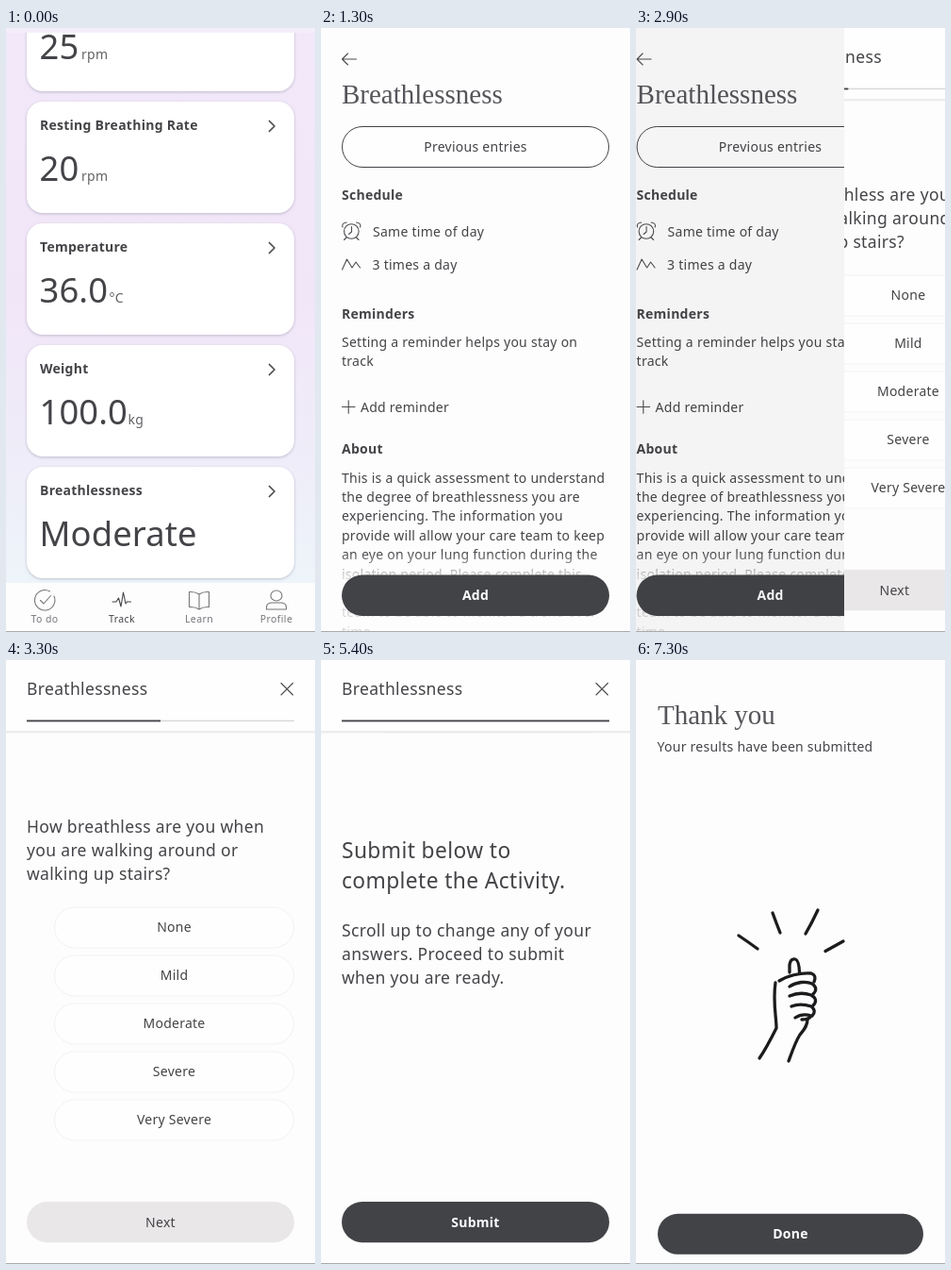
These frames come from a looping animation (328x640 px, 8 s). An HTML page:

```html
<!DOCTYPE html>
<html lang="en">
<head>
<meta charset="utf-8">
<title>Breathlessness check-in</title>
<style>
  html, body { margin: 0; width: 100%; height: 100%; overflow: hidden; background: #fdfdfd; }
  svg { display: block; width: 100%; height: 100%; }
  text { font: 14px "Noto Sans", "Open Sans", sans-serif; letter-spacing: .26px; fill: #444448; white-space: pre; }
  .semi { font-weight: 600; }
  .big { font-size: 36.4px; letter-spacing: .1px; }
  .unit { fill: #626266; }
  .serif { font: 29px "Liberation Serif", "Times New Roman", serif; letter-spacing: 0; fill: #55555a; }
  .lead { font-size: 17.5px; letter-spacing: .34px; }
  .head { font-size: 22.75px; letter-spacing: .4px; }
  .tab { font-size: 10.5px; letter-spacing: .4px; fill: #77777b; }
  .on { fill: #444448; }
  .light { fill: #fff; font-weight: 600; }
  .mid { text-anchor: middle; }
  .ico { fill: none; stroke: #4c4c50; stroke-width: 1.1; stroke-linecap: round; stroke-linejoin: round; }
  .ink { fill: none; stroke: #1c1c1e; stroke-width: 3.3; stroke-linecap: round; stroke-linejoin: round; }
  .card { filter: drop-shadow(0 1.5px 1.5px rgba(70, 60, 90, .28)); }
</style>
</head>
<body>
<svg id="stage" viewBox="0 0 328 640"></svg>
<script>
const W = 328, H = 640, LOOP = 8000, STEP = 100;
const DARK = '#424347', PALE = '#e9e7e8', PAGE = '#fdfdfd';

const text = (x, y, s, cls = '', more = '') => `<text x="${x}" y="${y}" class="${cls}" ${more}>${s}</text>`;
const lines = (x, y, gap, list, cls) => list.map((s, i) => text(x, y + i * gap, s, cls)).join('');
const rect = (x, y, w, h, fill, more = '') => `<rect x="${x}" y="${y}" width="${w}" height="${h}" fill="${fill}" ${more}/>`;
const path = (d, cls = 'ico', more = '') => `<path d="${d}" class="${cls}" ${more}/>`;
const pill = (x, y, w, h, fill, more = '') => rect(x, y, w, h, fill, `rx="${h / 2}" ${more}`);

function card(y, title, value, unit = '', unitX = 0, id = '') {
  return `<g ${id && `id="${id}"`}>` +
    rect(22, y, 284, 118, '#fff', 'rx="17" class="card"') +
    text(36, y + 30, title, 'semi') +
    path(`M279.5 ${y + 20.5}l5.5 5.5l-5.5 5.5`, 'ico', 'style="stroke-width:1.7"') +
    text(35.5, y + 84, value, 'big') + text(unitX, y + 84, unit, 'unit') + '</g>';
}

function tab(x, label, icon, cls = '') {
  return path(icon, 'ico', `style="stroke:${cls ? DARK : '#77777b'}"`) + text(x, 630, label, 'tab mid ' + cls);
}

const home = rect(0, 0, W, H, 'url(#sky)') +
  card(-51, 'Breathing Rate', '25', 'rpm', 80) +
  card(78, 'Resting Breathing Rate', '20', 'rpm', 80) +
  card(207, 'Temperature', '36.0', '°C', 109.5) +
  card(336, 'Weight', '100.0', 'kg', 129.5) +
  card(465, 'Breathlessness', 'Moderate', '', 0, 'tapped') +
  rect(0, 0, W, 5, '#f4eefa') +
  rect(0, 588, W, 52, '#fdfdfe') +
  tab(41, 'To do', 'M51 602A10.7 10.7 0 1 1 46.5 597M36.5 606.5l3.5 3.5l7.5 -8.5') +
  tab(123, 'Track', 'M113 608h4l2.5 -4l2.5 9l2.5 -15l2.5 12l1.5 -2h4', 'on') +
  tab(205, 'Learn', 'M205 600q-4 -3 -10.5 -2.5v16q6.5 -.5 10.5 2.5q4 -3 10.5 -2.5v-16q-6.5 -.5 -10.5 2.5v16') +
  tab(287, 'Profile', 'M281 601.5a6 5.5 0 1 1 12 0a6 5.5 0 1 1 -12 0M276.5 616v-2q0 -5 6 -5h9q6 0 6 5v2z');

const detail = rect(0, 0, W, H, PAGE) +
  path('M37.5 33H22.5M28.5 27l-6 6l6 6') +
  text(22, 79.5, 'Breathlessness', 'serif') +
  pill(22.5, 104.5, 283, 43, '#fefefe', `stroke="${DARK}"`) +
  text(164, 131, 'Previous entries', 'mid') +
  text(22, 181.5, 'Schedule', 'semi') +
  path('M24.5 215.5a7.8 7.8 0 1 1 15.6 0a7.8 7.8 0 1 1 -15.6 0M32.5 210.5v5.5l-3 2.5M23 211q-1.5 -4 4 -5M41.6 211q1.5 -4 -4 -5M27 222l-2.5 2.5M37.5 222l2.5 2.5') +
  text(55, 220.5, 'Same time of day') +
  path('M22.5 256l5 -11l5.5 9l4 -6l4.5 6') +
  text(54.5, 255.5, '3 times a day') +
  text(22, 307.5, 'Reminders', 'semi') +
  lines(22, 338, 19.8, ['Setting a reminder helps you stay on', 'track']) +
  path('M22.5 401.5h13.5M29.2 394.7v13.6') +
  text(42, 406.5, 'Add reminder') +
  text(22, 450.5, 'About', 'semi') +
  lines(22, 481.5, 20.4, [
    'This is a quick assessment to understand', 'the degree of breathlessness you are',
    'experiencing. The information you', 'provide will allow your care team to keep',
    'an eye on your lung function during the', 'isolation period. Please complete this',
    'assessment each day to allow your care', 'team to be able to monitor a trend over', 'time.']) +
  rect(0, 555, W, 85, 'url(#fade)') +
  `<g id="add">${pill(22, 579.5, 284, 43.5, DARK)}${text(164, 606, 'Add', 'light mid')}</g>`;

const choices = ['None', 'Mild', 'Moderate', 'Severe', 'Very Severe'];
const survey = rect(0, 0, W, H, PAGE) +
  '<g id="question">' +
  lines(22, 182.5, 25, ['How breathless are you when', 'you are walking around or', 'walking up stairs?'], 'lead') +
  choices.map((c, i) => {
    const y = 262 + i * 51;
    return pill(51.5, y, 254, 43, '#fefefe', `stroke="#f3f2f3" ${i === 2 ? 'id="picked"' : ''}`) +
      text(178.5, y + 26, c, 'mid');
  }).join('') + '</g><g id="summary">' +
  lines(22, 210, 32, ['Submit below to', 'complete the Activity.'], 'head') +
  lines(22, 292.5, 25, ['Scroll up to change any of your', 'answers. Proceed to submit', 'when you are ready.'], 'lead') +
  '</g>' +
  rect(0, 0, W, 76, '#fefefe') + rect(0, 75.5, W, 3.5, 'url(#edge)') +
  text(22, 36.5, 'Breathlessness', 'lead') +
  path('M292 24.5l12.5 12.5M304.5 24.5l-12.5 12.5') +
  rect(22, 63.7, 284, 1.5, '#d9d8da') + rect(22, 63.6, 0, 1.8, DARK, 'id="bar"') +
  pill(22, 574, 284, 43.2, PALE, 'id="next"') +
  text(164, 600.5, 'Next', 'mid', 'id="label"') +
  path('M164 580.5A15.5 15.5 0 1 0 179.5 596', 'ink', 'id="spin" style="stroke:#fff;stroke-width:3;stroke-linecap:butt"');

const done = rect(0, 0, W, H, PAGE) +
  text(23, 68, 'Thank you', 'serif') +
  text(22.5, 97, 'Your results have been submitted') +
  path('M109 292q9 6 20 14M145 268q4 11 8 21M193 265q-6 13 -13 25M220 298q-9 5 -19 10.5', 'ink') +
  path('M163 331v-8q1 -7 6 -6q4 1 4.5 14', 'ink') +
  path('M152 340C160 335 174 331 186 332Q192 334 189 341', 'ink') +
  path('M163 346C170 341 181 340 187 343Q194 348 188 354M163 356C172 352 180 353 186 355Q194 360 188 366M165 367C172 364 180 365 186 367Q192 372 187 377M169 379C175 375 180 375 186 377Q184 381 176 381', 'ink') +
  path('M148 342C145 362 149 378 149 390C143 402 138 412 131 422', 'ink') +
  path('M182 381C182 388 178 392 174 397C169 405 166 414 162 425', 'ink') +
  pill(23, 586.8, 282, 43, DARK) + text(164, 613, 'Done', 'light mid');

const pages = [home, detail, survey, done];
const stop = (o, c, a = 1) => `<stop offset="${o}" stop-color="${c}" stop-opacity="${a}"/>`;
const gradient = (id, stops) => `<linearGradient id="${id}" x1="0" y1="0" x2="0" y2="1">${stops}</linearGradient>`;

const stage = document.getElementById('stage');
stage.innerHTML = '<defs>' +
  gradient('sky', stop(0, '#f1e8f9') + stop(.45, '#f1e6f8') + stop(.72, '#efedf9') + stop(.92, '#edf4fa')) +
  gradient('fade', stop(0, PAGE, 0) + stop(.3, PAGE, .78) + stop(1, PAGE, .8)) +
  gradient('edge', stop(0, '#dcdbdd') + stop(1, PAGE, 0)) +
  pages.map((_, i) => `<clipPath id="clip${i}"><rect id="cut${i}" width="${W}" height="${H}"/></clipPath>`).join('') +
  '</defs>' +
  pages.map((p, i) => `<g id="page${i}" clip-path="url(#clip${i})"><g id="body${i}">${p}` +
    rect(0, 0, W, H, '#000', `id="dim${i}" opacity="0"`) + '</g></g>').join('') +
  rect(0, 639, W, 1, '#aaa9ab');

const $ = id => document.getElementById(id);
const set = (id, attrs) => { for (const k in attrs) $(id).setAttribute(k, attrs[k]); };

// Linear interpolation through [time, value] pairs.
function track(t, keys) {
  if (t <= keys[0][0]) return keys[0][1];
  for (let i = 1; i < keys.length; i++) {
    const [t0, a] = keys[i - 1], [t1, b] = keys[i];
    if (t < t1) return a + (b - a) * (t - t0) / (t1 - t0);
  }
  return keys[keys.length - 1][1];
}

// Critically damped slide, settled at its end time.
const slides = [null, [760, 1300], [2822, 3300], [6868, 7300]];
function slide(t, span) {
  if (!span || t >= span[1]) return 1;
  const k = Math.max(0, t - span[0]) * .015;
  return 1 - (1 + k) * Math.exp(-k);
}

function draw(t) {
  const enter = slides.map(s => slide(t, s));
  pages.forEach((_, i) => {
    const p = enter[i], out = i < 3 ? enter[i + 1] : 0;
    const edge = W * (1 - p);
    $('page' + i).style.display = p > 0 && out < 1 ? '' : 'none';
    set('cut' + i, { x: edge });
    set('body' + i, { transform: `translate(${edge / 2 - out * W * .2} 0)` });
    set('dim' + i, { opacity: out * .11 });
  });

  set('tapped', { opacity: track(t, [[400, 1], [500, .7], [600, .45]]) });
  set('add', { opacity: track(t, [[2400, 1], [2600, .5], [2800, .85], [2900, 1]]) });

  const picked = t >= 4300, loading = t >= 6500;
  const scroll = track(t, [[5000, 0], [5100, .12], [5200, .55], [5300, .9], [5400, 1]]);
  set('picked', { fill: picked ? PALE : '#fefefe', stroke: picked ? PALE : '#f3f2f3' });
  set('question', { transform: `translate(0 ${-432 * scroll})` });
  set('summary', { transform: `translate(0 ${432 * (1 - scroll)})`, opacity: Math.min(1, scroll * 3) });
  set('bar', { width: 284 * (track(t, [[2800, .24], [2900, .327], [3200, .5]]) + scroll / 2) });
  set('next', { fill: picked ? DARK : PALE });
  set('label', { class: picked ? 'light mid' : 'mid', opacity: loading ? 0 : 1 });
  $('label').textContent = scroll > .5 ? 'Submit' : 'Next';
  set('spin', { opacity: loading ? 1 : 0, transform: `rotate(${(t - 6900) * .36} 164 596)` });
}

const start = performance.now();
function tick() {
  const t = (performance.now() - start) % LOOP;
  draw(Math.floor(t / STEP) * STEP);
  requestAnimationFrame(tick);
}
tick();
</script>
</body>
</html>
```
